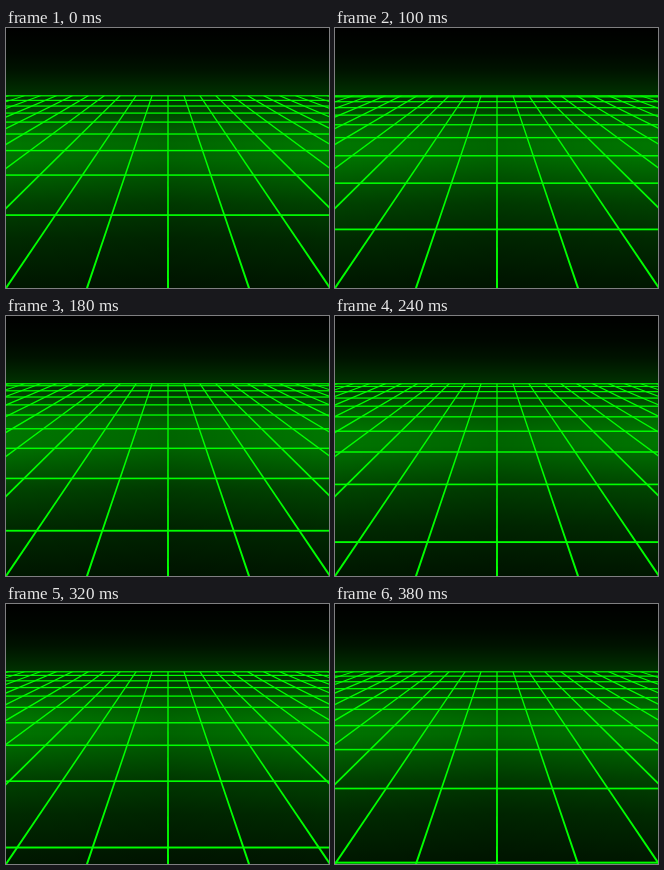
Write an HTML page with a canvas that moves like this. It is 323 by 260 pixels and loops after 400 ms.

```html
<!DOCTYPE html>
<html lang="en">
<head>
<meta charset="utf-8">
<title>Green grid</title>
<style>
  html, body { margin: 0; width: 100%; height: 100%; overflow: hidden; background: #000; }
  canvas { display: block; }
</style>
</head>
<body>
<canvas id="stage" width="323" height="260"></canvas>
<script>
const ctx = document.getElementById("stage").getContext("2d");
const W = 323, H = 260;
const LOOP = 400, TICK = 20;
const CENTER = 162;
const VANISH = 20.6;      // vanishing height, above the visible far edge
const EDGE = 67.8;        // far edge of the floor
const NEAR = 0.006006;    // inverse depth of a row at the loop start
const ROW_STEP = 0.0019;  // inverse depth between rows
const SPREAD = 0.3383;    // column spacing per pixel below the vanishing height

function gradient(x, y, stops) {
  const result = ctx.createLinearGradient(0, 0, x, y);
  for (const [at, color] of stops) result.addColorStop(at / (x || y), color);
  return result;
}

const backdrop = gradient(0, H, [
  [0, 0], [25, 7], [42, 19], [56, 36], [67, 50], [82, 72], [100, 102],
  [115, 118], [130, 116], [150, 93], [175, 66], [210, 42], [260, 22]
].map(([y, green]) => [y, `rgb(0,${green},0)`]));

// The floor is a little darker along its middle.
const middleShade = gradient(W, 0, [
  [0, "rgba(0,0,0,0)"], [CENTER, "rgba(0,0,0,0.14)"], [W, "rgba(0,0,0,0)"]
]);

const lineWidth = y => 1.2 + 0.8 * (y - EDGE) / (H - EDGE);

function drawRow(y) {
  const width = lineWidth(y);
  ctx.fillRect(0, y - width / 2, W, width);
}

function drawColumn(index) {
  const xAt = y => CENTER + index * SPREAD * (y - VANISH);
  const top = xAt(EDGE), bottom = xAt(H);
  const slant = Math.hypot(1, index * SPREAD);
  const a = Math.min(lineWidth(EDGE) * slant, 3) / 2;
  const b = lineWidth(H) * slant / 2;
  ctx.beginPath();
  ctx.moveTo(top - a, EDGE);
  ctx.lineTo(top + a, EDGE);
  ctx.lineTo(bottom + b, H);
  ctx.lineTo(bottom - b, H);
  ctx.fill();
}

function draw(time) {
  const phase = Math.floor((time % LOOP) / TICK) * TICK / LOOP;
  ctx.fillStyle = backdrop;
  ctx.fillRect(0, 0, W, H);
  ctx.fillStyle = middleShade;
  ctx.fillRect(0, EDGE, W, H - EDGE);

  ctx.fillStyle = "#00ff00";
  for (let i = -10; i <= 10; i++) drawColumn(i);
  for (let row = -1; row <= 9; row++) {
    const y = VANISH + 1 / (NEAR + (row - phase) * ROW_STEP);
    if (y > EDGE && y < H + 2) drawRow(y);
  }
  drawRow(EDGE);
}

const start = performance.now();
function frame() {
  draw(performance.now() - start);
  requestAnimationFrame(frame);
}
frame();
</script>
</body>
</html>
```
